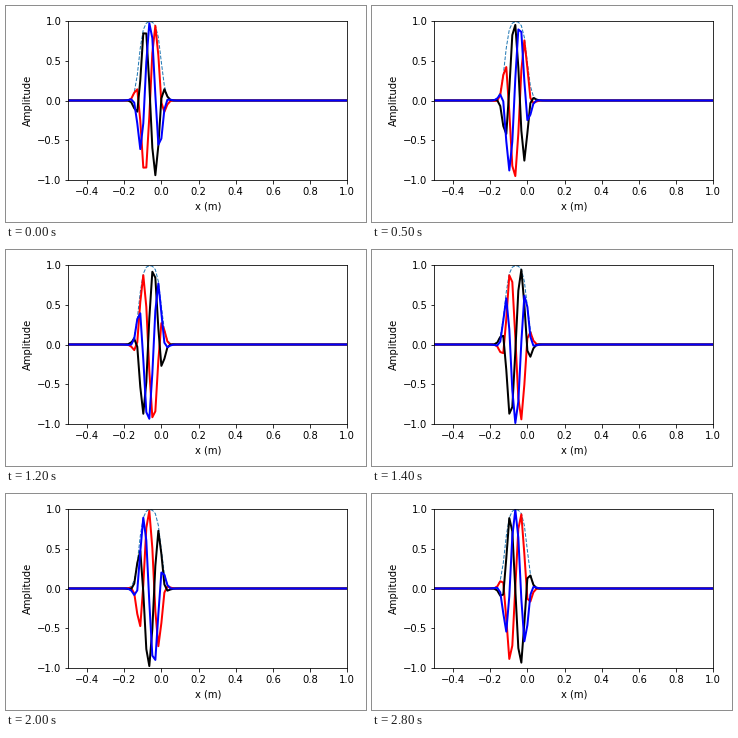
Write a matplotlib script that moves like this. It is 360x216 px and loops after 2900 ms.

```python
import numpy as np
import matplotlib.pyplot as plt
from matplotlib.animation import FuncAnimation

WIDTH, HEIGHT, DPI = 360, 216, 72
FRAMES, INTERVAL = 29, 100

STEP = 0.0162                  # grid spacing, m
WAVENUMBER = 52.4              # rad/m
CENTER = -4 * STEP             # phase reference, m
PULSE_START, PULSE_END = -0.121, -0.001
EDGE = 0.0228                  # width of the envelope's flanks, m
START_PHASE = 0.2

plt.rcParams["font.family"] = "DejaVu Sans"
plt.rcParams["font.size"] = 10

x = np.arange(-32, 64) * STEP
envelope = 0.5 * (np.tanh((x - PULSE_START) / EDGE)
                  - np.tanh((x - PULSE_END) / EDGE))

fig, ax = plt.subplots(figsize=(WIDTH / DPI, HEIGHT / DPI), dpi=DPI,
                       facecolor="white")
ax.plot(x, envelope, "--", color="C0", lw=1)
red, black, blue = (ax.plot(x, 0 * x, color=c, lw=2)[0]
                    for c in ("red", "black", "blue"))
ax.set_xlim(-0.5, 1)
ax.set_ylim(-1, 1)
ax.set_xlabel("x (m)")
ax.set_ylabel("Amplitude")
fig.tight_layout()


def update(i):
    phase = WAVENUMBER * (x - CENTER) - START_PHASE - 2 * np.pi * i / FRAMES
    red.set_ydata(envelope * np.sin(phase))
    black.set_ydata(-envelope * np.sin(phase))
    blue.set_ydata(envelope * np.cos(phase))
    return red, black, blue


anim = FuncAnimation(fig, update, frames=FRAMES, interval=INTERVAL,
                     repeat=True, repeat_delay=0, blit=False)
plt.show()
```
